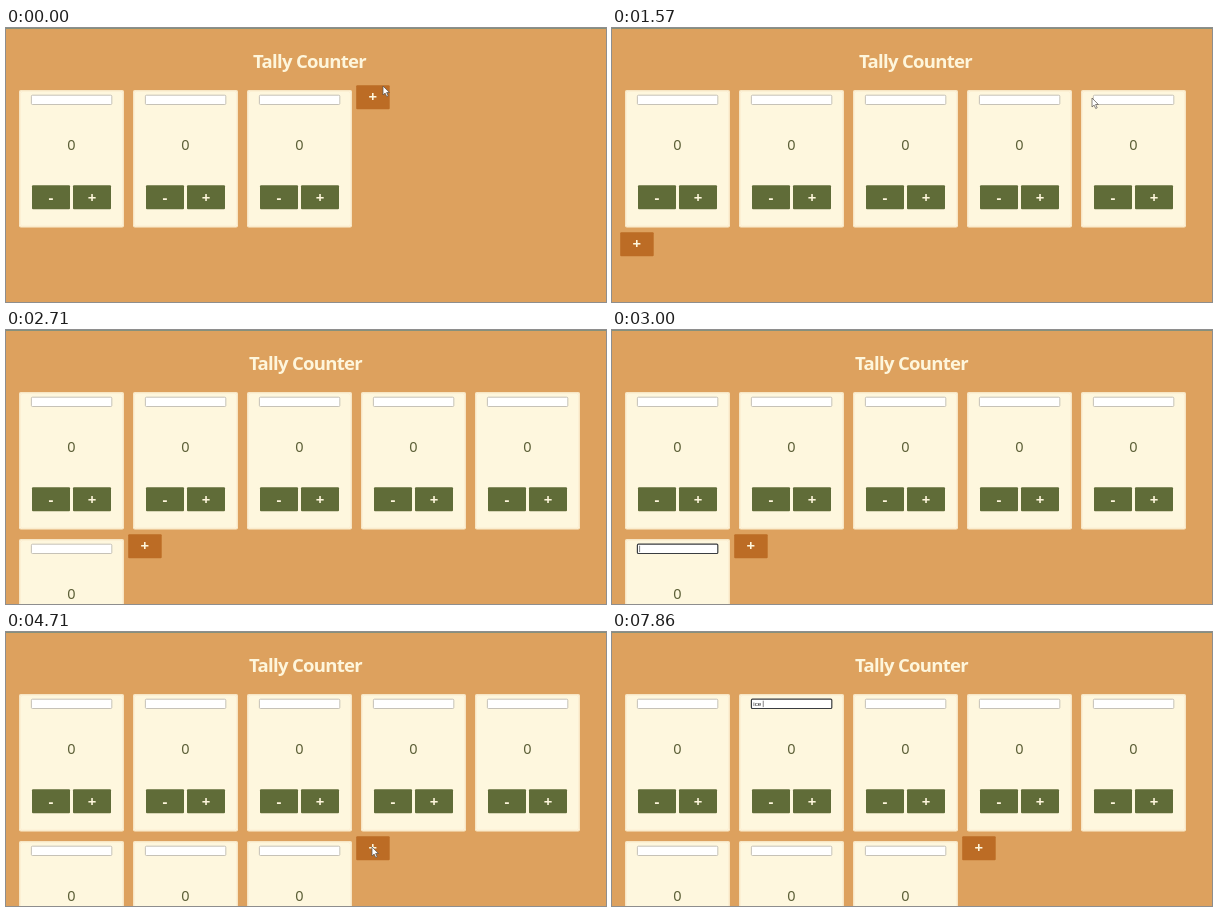
Animation, 600 px wide and 274 px high, one loop 8 s. Source, as an HTML page:

```html
<!DOCTYPE html>
<html lang="en">
<head>
<meta charset="utf-8">
<title>Tally Counter</title>
<style>
html, body { margin: 0; width: 100%; height: 100%; overflow: hidden; background: #dda15e; }
svg { display: block; }
text { font-family: "Noto Sans", "Open Sans", sans-serif; text-anchor: middle; }
#title { font-size: 18.5px; font-weight: 600; fill: #fef6dc; letter-spacing: -.7px; }
.card { fill: #fef7de; }
.edge { fill: none; stroke: #dda15e; }
.field { fill: #fff; stroke: #b8b4aa; stroke-width: .8; }
.focus .field { stroke: #3a3d40; stroke-width: 1.2; }
.count { font-size: 14.5px; fill: #5d6038; }
.btn { fill: #606c38; }
.sign { font-size: 15px; font-weight: 600; fill: #fef6dc; }
.add { fill: #bc6c25; }
#typed { font: 6.2px "Liberation Sans", Arial, sans-serif; fill: #222; text-anchor: start; white-space: pre; }
#caret { stroke: #333; stroke-width: .6; }
</style>
</head>
<body>
<svg width="600" height="274" viewBox="0 0 600 274">
  <defs>
    <g id="face">
      <rect class="card" width="105" height="137.5" rx="2"/>
      <rect class="edge" x=".5" y=".5" width="104" height="136.5" rx="2" opacity=".2"/>
      <rect class="edge" x="1.5" y="1.5" width="102" height="134.5" rx="2" opacity=".07"/>
      <text class="count" x="52.5" y="60.3">0</text>
      <rect class="btn" x="13" y="95.2" width="38" height="24" rx="1"/>
      <rect class="btn" x="54" y="95.2" width="38" height="24" rx="1"/>
      <text class="sign" x="32" y="112.5">-</text>
      <text class="sign" x="73" y="112.5">+</text>
    </g>
  </defs>
  <rect width="600" height="274" fill="#dda15e"/>
  <rect width="600" height="1" fill="#86907c"/>
  <text id="title" y="39.7">Tally Counter</text>
  <g id="cards"></g>
  <g id="add">
    <rect class="add" width="33.5" height="24" rx="1"/>
    <text class="sign" x="16.7" y="17.2">+</text>
  </g>
  <text id="typed"></text>
  <path id="caret"/>
  <path id="pointer" d="M0 0V9L2.1 7.1 3.7 10.5 5.2 9.8 3.6 6.5H6.4Z" fill="#fff" stroke="#55504a" stroke-width=".7"/>
</svg>
<script>
// The screen refreshes seven times a second; all times below count those ticks.
const RATE = 7, LOOP = 8000;
const $ = id => document.getElementById(id);
const show = (el, on) => { el.style.display = on ? "" : "none"; };
const slot = i => [13 + 114 * (i % 5), 62 + 147 * Math.floor(i / 5)];
const field = { x: 12.4, y: 5.2, w: 80.4, h: 9.3 };

const clicks = [6, 10, 18, 25, 31];
const home = [377, 58];
// Pointer moves: ticks taken, tick of arrival, x, y
const moves = [
  [1, 1, 183, 108], [2, 3, 321, 34], [1, 6, 374, 64], [3, 10, 480, 70],
  [4, 17, 24, 215], [2, 20, 50, 218], [2, 24, 138, 215], [1, 26, 190, 218],
  [2, 30, 252, 215], [2, 33, 366, 215], [3, 38, 160, 70]
];

const ease = u => u * u * (3 - 2 * u);
const clamp = u => Math.min(1, Math.max(0, u));

function pointerAt(k) {
  let [x, y] = home;
  for (const [span, end, toX, toY] of moves) {
    const u = ease(clamp((k - end + span) / span));
    x += (toX - x) * u;
    y += (toY - y) * u;
  }
  return [x, y];
}

function overField([px, py], n) {
  return cards.slice(0, n).some((_, i) => {
    const [x, y] = slot(i), dx = px - x - field.x, dy = py - y - field.y;
    return dx > 0 && dx < field.w && dy > 0 && dy < field.h;
  });
}

const cards = Array.from({ length: 3 + clicks.length }, (_, i) => {
  const g = document.createElementNS("http://www.w3.org/2000/svg", "g");
  g.setAttribute("transform", `translate(${slot(i)})`);
  g.innerHTML = `<use href="#face"/><rect class="field" x="${field.x}" y="${field.y}" width="${field.w}" height="${field.h}" rx="1"/>`;
  $("cards").append(g);
  return g;
});

function draw(k) {
  const n = 3 + clicks.filter(c => c <= k).length;
  const active = k >= 41 ? 1 : k >= 20 && k < 24 ? 5 : -1;
  cards.forEach((g, i) => {
    show(g, i < n);
    g.classList.toggle("focus", i === active);
  });

  // The second row brings a scrollbar, which shifts the centred title
  $("title").setAttribute("x", n > 5 ? 299.5 : 303.5);
  const [x, y] = slot(n);
  $("add").setAttribute("transform", `translate(${x - 4.8} ${y - 4.8})`);

  const [fx, fy] = slot(Math.max(active, 0));
  const word = "ice ".slice(0, Math.max(0, Math.floor((k - 47.65) * .43) + 1));
  const typed = $("typed");
  typed.textContent = word;
  typed.setAttribute("x", fx + 14.3);
  typed.setAttribute("y", fy + 12.2);
  const end = fx + 14.6 + (word && typed.getComputedTextLength());
  $("caret").setAttribute("d", `M${end} ${fy + 6.7}v6.4`);
  const since = active === 1 ? 41 : 20;
  show($("caret"), active >= 0 && (word || (k - since) % 10 < 5));

  const tip = pointerAt(k);
  show($("pointer"), !overField(tip, n));
  $("pointer").setAttribute("transform", `translate(${tip})`);
}

const start = performance.now();
function tick() {
  const t = (performance.now() - start) % LOOP;
  draw(Math.floor((t + 5) * RATE / 1000));
  requestAnimationFrame(tick);
}
tick();
</script>
</body>
</html>
```
